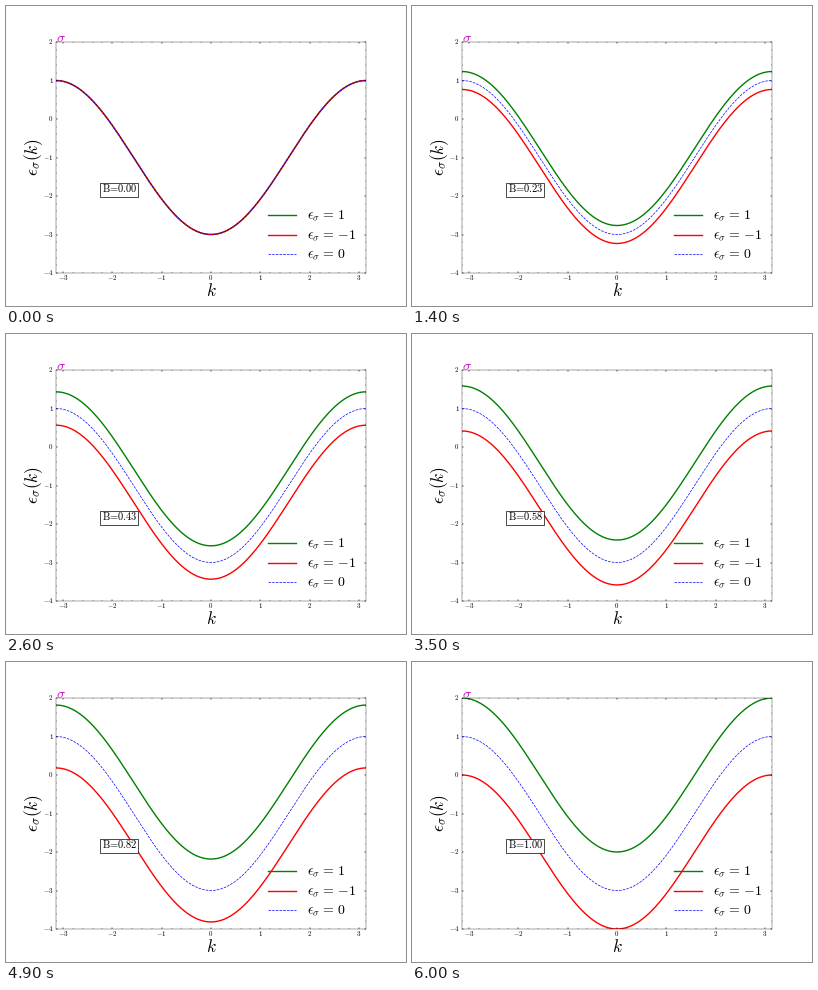
Write a matplotlib script that moves like this. It is 400 px wide and 300 px high and loops after 9840 ms.

```python
import numpy as np
import matplotlib.pyplot as plt
from matplotlib.animation import FuncAnimation
from matplotlib.lines import Line2D
from matplotlib.patches import Rectangle

WIDTH, HEIGHT, DPI = 400, 300, 50
LOOP_MS, TICK_MS, STEP_MS, STEPS = 9840, 20, 100, 60

plt.rcParams["mathtext.fontset"] = "cm"
fig = plt.figure(figsize=(WIDTH / DPI, HEIGHT / DPI), dpi=DPI, facecolor="white")
ax = fig.add_axes([0.125, 0.11, 0.775, 0.77])
ax.set(xlim=(-np.pi, np.pi), ylim=(-4, 2), xticks=[], yticks=[])
for spine in ax.spines.values():
    spine.set_linewidth(0.5)


def label(x, y, text, size, **style):
    """Text with its baseline at stage pixel (x, y), y counted from the top."""
    return fig.text(x / WIDTH, 1 - y / HEIGHT, text, fontsize=size,
                    va="baseline", **style)


def tick_marks(x, y, marker, size):
    ax.plot(x, y, ls="", marker=marker, ms=size, mew=0.5, mec="black", clip_on=False)


def px(k):
    return 205 + 155 * k / np.pi


def py(energy):
    return 36 + 38.5 * (2 - energy)


def draw_axes():
    left, right, up, down = range(4)
    for step, size in ((1, 3), (0.2, 1.5)):
        xs = np.arange(-round(3 / step), round(3 / step) + 1) * step
        ys = np.arange(-round(4 / step), round(2 / step) + 1) * step
        tick_marks(xs, np.full_like(xs, -4, dtype=float), up, size)
        tick_marks(xs, np.full_like(xs, 2, dtype=float), down, size)
        tick_marks(np.full_like(ys, -np.pi, dtype=float), ys, right, size)
        tick_marks(np.full_like(ys, np.pi, dtype=float), ys, left, size)
    for k in range(-3, 4):
        label(px(k), 274.2, f"${k}$", 10, ha="center")
    for energy in range(-4, 3):
        label(47.5, py(energy) + 2.2, f"${energy}$", 10, ha="right")
    label(205, 290.3, "$k$", 25, ha="center")
    label(32, 151, r"$\epsilon_{\sigma}(k)$", 25, ha="center",
          rotation=90, rotation_mode="anchor")
    label(50, 36, r"$\sigma$", 20, color="m")


def draw_legend():
    rows = (("1", 208.5, SOLID_UP), ("{-}1", 228.5, SOLID_DOWN), ("0", 247.7, DASHED))
    for value, y, style in rows:
        fig.add_artist(Line2D([262 / WIDTH, 289.8 / WIDTH], [1 - y / HEIGHT] * 2, **style))
        label(300.7, y + 4.6,
              rf"$\epsilon_{{\sigma}}\hspace{{0.116}}=\hspace{{0.116}}{value}$", 20)


SOLID_UP = dict(color="green", lw=2)
SOLID_DOWN = dict(color="red", lw=2)
DASHED = dict(color="blue", lw=1, ls="--")

k = np.linspace(-np.pi, np.pi, 200)
band = -1 - 2 * np.cos(k)
upper, = ax.plot(k, band, **SOLID_UP)
lower, = ax.plot(k, band, **SOLID_DOWN)
ax.plot(k, band, **DASHED)
draw_axes()
draw_legend()

fig.add_artist(Rectangle((94 / WIDTH, 1 - 190.7 / HEIGHT), 38 / WIDTH, 14 / HEIGHT,
                         fc="white", ec="black", lw=1, zorder=2.5))
readout = label(96.4, 186.2, "", 15)


def update(i):
    field = min(i * TICK_MS // STEP_MS, STEPS) / STEPS
    upper.set_ydata(band + field)
    lower.set_ydata(band - field)
    readout.set_text(rf"$\mathrm{{B}}\hspace{{-0.2}}=\hspace{{-0.2}}{field:.2f}$")
    return upper, lower, readout


anim = FuncAnimation(fig, update, frames=LOOP_MS // TICK_MS, interval=TICK_MS,
                     repeat=True, repeat_delay=0, cache_frame_data=False)
plt.show()
```
